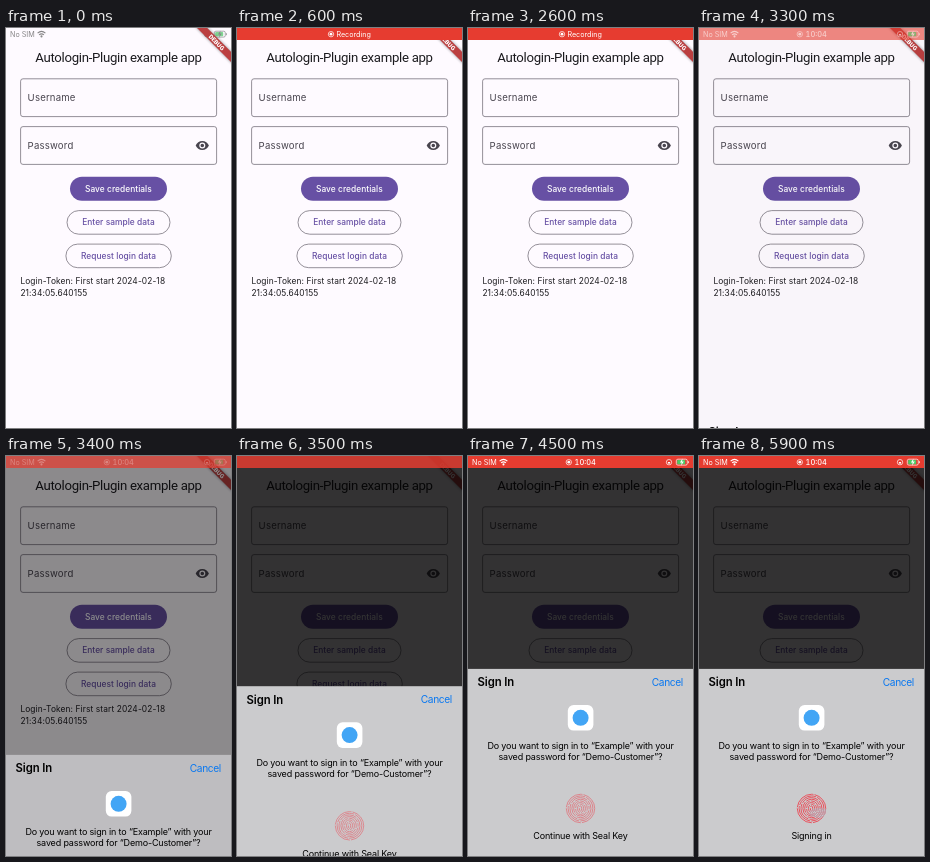
An HTML page that plays this animation: 225 px wide and 400 px high, repeating every 6000 ms.

```html
<!DOCTYPE html>
<html lang="en">
<head>
<meta charset="utf-8">
<title>Autologin demo</title>
<style>
  html, body { margin: 0; width: 100%; height: 100%; overflow: hidden; background: #fefaff; }
  svg { display: block; width: 225px; height: 400px; }
  text { font-family: Inter, "Open Sans", sans-serif; white-space: pre; }
  .mid { text-anchor: middle; }
  .title { font: 13.2px Roboto, sans-serif; letter-spacing: -.3px; fill: #1c1b1f; }
  .field { font-size: 9.6px; letter-spacing: .18px; fill: #49454f; }
  .btn { font-size: 8.4px; font-weight: 500; letter-spacing: .04px; fill: #6750a4; }
  .note { font-size: 8.4px; letter-spacing: .1px; fill: #1c1b1f; }
  .line { fill: none; stroke: #79747e; stroke-width: .8; }
  .status { font-size: 7.2px; }
  .clock { font-size: 7.4px; font-weight: 500; font-feature-settings: "tnum"; }
  .head { font-size: 11.3px; font-weight: 600; letter-spacing: -.1px; }
  .link { font-size: 10.2px; letter-spacing: -.4px; fill: #0a78f0; }
  .ask { font-size: 9px; letter-spacing: -.16px; }
</style>
</head>
<body>
<svg viewBox="0 0 225 400">
  <defs>
    <filter id="soft" x="-20%" y="-80%" width="140%" height="260%"><feGaussianBlur stdDeviation="1.5"/></filter>
    <g id="system">
      <text class="status" x="4" y="8.7">No SIM</text>
      <g fill="none" stroke="currentColor" stroke-width="1.1">
        <path d="M31.6 5.2Q35.5 1.5 39.4 5.2M33.1 6.9Q35.5 4.7 37.9 6.9"/>
        <circle cx="35.5" cy="8.4" r=".5"/>
      </g>
      <g fill="none" stroke="currentColor" stroke-width=".7">
        <circle cx="201" cy="6.2" r="2.7"/>
        <rect x="208.3" y="3.2" width="11" height="5.9" rx="1.6"/>
        <path d="M220.5 5.2v2"/>
      </g>
      <path d="M199.9 6h2.2v1.6h-2.2z"/>
      <rect x="209.2" y="4.1" width="8" height="4.1" rx=".8" fill="#4cc864"/>
      <path d="M214.6 2.6l-2.7 4h1.8l-.7 3.2 2.8-4.2h-1.8z"/>
    </g>
    <g id="rec">
      <circle r="2.7" fill="none" stroke="#fff" stroke-width=".7"/>
      <circle r="1.4" fill="#fff"/>
    </g>
    <clipPath id="spot"><ellipse id="glint" cx="118" cy="145" rx="10" ry="5"/></clipPath>
    <g id="ridges" fill="none" stroke-width=".95" stroke-linecap="round"></g>
  </defs>

  <rect width="225" height="400" fill="#fefaff"/>
  <text class="title mid" x="112.5" y="34">Autologin-Plugin example app</text>
  <rect class="line" x="14.6" y="50.8" width="196" height="37.8" rx="2.4"/>
  <text class="field" x="21.6" y="73.4">Username</text>
  <rect class="line" x="14.6" y="98.6" width="196" height="37.8" rx="2.4"/>
  <text class="field" x="21.6" y="121.4">Password</text>
  <path fill="#49454f" transform="translate(189.1 110.3) scale(.6)" d="M12 4.5C7 4.5 2.7 7.6 1 12c1.7 4.4 6 7.5 11 7.5s9.3-3.1 11-7.5c-1.7-4.4-6-7.5-11-7.5zM12 17a5 5 0 1 1 0-10 5 5 0 0 1 0 10zm0-8a3 3 0 1 0 0 6 3 3 0 0 0 0-6z"/>
  <rect x="64" y="148.8" width="97" height="24" rx="12" fill="#6750a4"/>
  <text class="btn mid" x="112.4" y="163.8" style="fill:#fff">Save credentials</text>
  <rect class="line" x="61" y="182.6" width="103" height="23.6" rx="11.8"/>
  <text class="btn mid" x="112.5" y="197.4">Enter sample data</text>
  <rect class="line" x="59.9" y="216.1" width="105.4" height="23.6" rx="11.8"/>
  <text class="btn mid" x="112.5" y="230.9">Request login data</text>
  <text class="note" x="14.4" y="256.4">Login-Token: First start 2024-02-18</text>
  <text class="note" x="14.4" y="268.4">21:34:05.640155</text>
  <g id="dark" color="#555" fill="#555"><use href="#system"/></g>
  <g transform="translate(225) rotate(45)">
    <rect x="-26" y="16.8" width="52" height="7.2" opacity=".45" filter="url(#soft)"/>
    <rect x="-26" y="16.8" width="52" height="7.2" fill="#bb3f40"/>
    <text class="mid" y="22.6" font-weight="900" fill="#fff" style="font-size:6.1px;font-family:Roboto,sans-serif">DEBUG</text>
  </g>

  <rect id="scrim" width="225" height="400"/>
  <g id="sheet">
    <rect id="panel" y=".9" width="225" height="400" fill="#cbcbcd"/>
    <text class="head" x="9.6" y="18.4">Sign In</text>
    <text class="link" x="183.8" y="18">Cancel</text>
    <rect x="99.8" y="37" width="25.6" height="25.6" rx="5.8" fill="#fff"/>
    <circle cx="112.6" cy="49.8" r="8" fill="#42a5f5"/>
    <text class="ask mid" x="112.5" y="81.2">Do you want to sign in to “Example” with your</text>
    <text class="ask mid" x="112.5" y="91.6">saved password for “Demo-Customer”?</text>
    <use id="ink" href="#ridges" stroke="#ea4c58"/>
    <g id="shine" clip-path="url(#spot)"><use href="#ridges" stroke="#b3a9b8"/></g>
    <text id="prompt" class="ask mid" x="112.5" y="171.4"></text>
  </g>

  <rect id="bar" width="225" height="12" fill="#e63c30"/>
  <g id="recording">
    <use href="#rec" x="94" y="6.2"/>
    <text class="status" x="99.4" y="8.8" fill="#fff">Recording</text>
  </g>
  <g id="light" color="#fff" fill="#fff">
    <use href="#system"/>
    <use href="#rec" x="100.8" y="6.2"/>
    <text class="clock" x="106.6" y="8.9">10:04</text>
  </g>
</svg>
<script>
  const LOOP = 6000, STEP = 100;
  const $ = id => document.getElementById(id);

  // Opacity over time: [time, value] pairs joined by straight lines
  const fades = {
    dark: [[0, .7], [300, 0]],
    bar: [[0, 0], [300, 1], [3000, 1], [3300, .6], [3500, .84], [3700, 1]],
    recording: [[100, 0], [400, 1], [2900, 1], [3100, 0]],
    light: [[3000, 0], [3300, .6], [3500, 0], [3600, 0], [3800, 1]],
    scrim: [[3200, 0], [3300, .02], [3400, .45], [3500, .8]],
    panel: [[3300, 0], [3400, .8], [3500, 1]],
    ink: [[3500, .55], [5000, .6], [5500, 1]],
    shine: [[5300, 0], [5700, .9]]
  };
  const sheetTop = [[3200, 402], [3300, 390], [3400, 298], [3500, 229.3], [3600, 217.5], [3700, 213.8], [3800, 212.4], [3900, 212]];
  const glintX = [[5300, 110], [5900, 120]];

  function at(track, t) {
    const i = track.findIndex(p => p[0] > t);
    if (i === 0) return track[0][1];
    if (i < 0) return track[track.length - 1][1];
    const [t0, a] = track[i - 1], [t1, b] = track[i];
    return a + (b - a) * (t - t0) / (t1 - t0);
  }

  // Broken rings, slightly tall at the centre, form the fingerprint
  function drawRidges() {
    let rings = '';
    for (let k = 0; k < 8; k++) {
      const r = 1.2 + k * 1.86;
      rings += `<ellipse cx="112.5" cy="140.5" rx="${r}" ry="${r + (7 - k) * .2}"
        stroke-dasharray="${6 + k * 2.3} 1.9" stroke-dashoffset="${k * 3.7}"/>`;
    }
    $('ridges').innerHTML = rings;
  }

  function draw(t) {
    for (const id in fades) $(id).setAttribute('opacity', at(fades[id], t));
    $('sheet').setAttribute('transform', `translate(0 ${at(sheetTop, t)})`);
    $('glint').setAttribute('cx', at(glintX, t));
    $('prompt').textContent = t < 5300 ? 'Continue with Seal Key' : 'Signing in';
  }

  const start = performance.now();
  function tick() {
    const t = (performance.now() - start) % LOOP;
    draw(Math.floor(t / STEP) * STEP);
    requestAnimationFrame(tick);
  }

  drawRidges();
  draw(0);
  requestAnimationFrame(tick);
</script>
</body>
</html>
```
